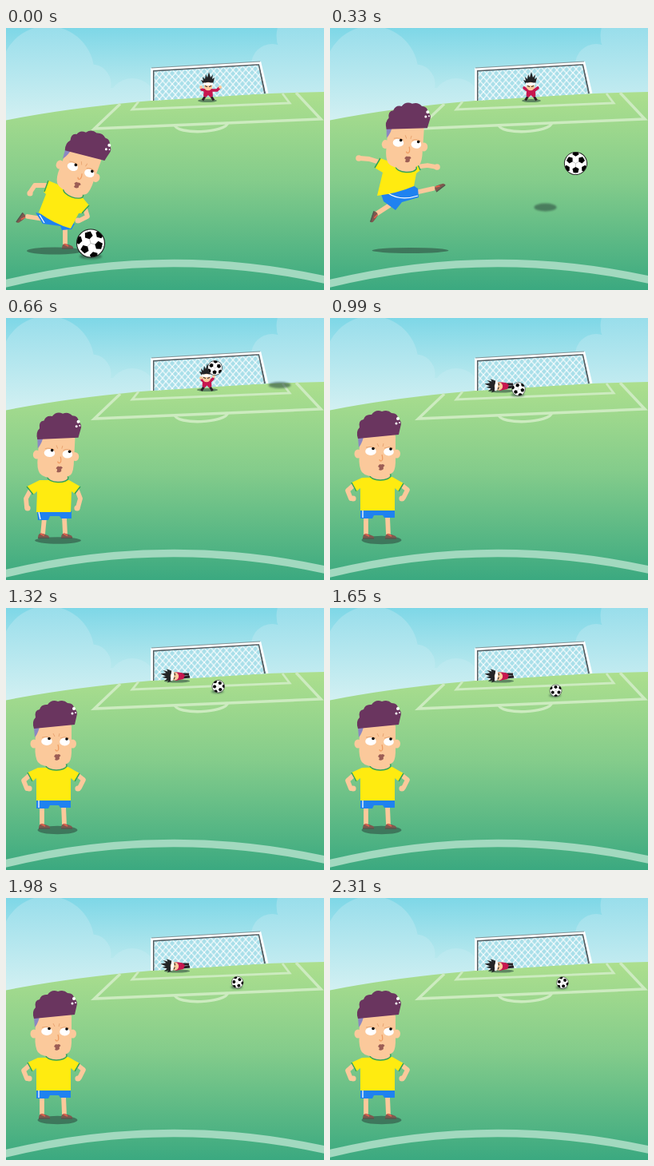
Write an HTML page that moves like this. It is 398 px wide and 328 px high and loops after 3300 ms.

```html
<!DOCTYPE html>
<html lang="en">
<head>
<meta charset="utf-8">
<title>Penalty kick</title>
<style>
html, body { margin: 0; width: 100%; height: 100%; overflow: hidden; }
svg { display: block; width: 398px; height: 328px; }
.pose, .keeper { display: none; }
.on { display: inline; }
.shade { fill: #2f4f42; opacity: .6; }
#ballShade { filter: blur(.8px); }
.skin { fill: #fbc99b; }
.limb { fill: none; stroke: #fbc99b; stroke-width: 5.8; stroke-linecap: round; stroke-linejoin: round; }
.shirt { fill: #ffeb10; }
.shorts { fill: #1f82f0; }
.trim { fill: none; stroke: #35a35a; stroke-width: 1.5; }
.stripe { fill: none; stroke: #fff; stroke-width: 1.3; }
.red { fill: #c6174f; }
.redArm { fill: none; stroke: #c6174f; stroke-width: 3.6; stroke-linecap: round; stroke-linejoin: round; }
.boot { fill: none; stroke: #2a2226; stroke-width: 3; }
.line { fill: none; stroke: #cdebc0; stroke-width: 3.4; }
</style>
</head>
<body>
<svg viewBox="0 0 398 328">
  <defs>
    <linearGradient id="sky" x2="0" y2="1">
      <stop stop-color="#7ed7e7"/><stop offset="1" stop-color="#d8f2f1"/>
    </linearGradient>
    <linearGradient id="cloud" gradientUnits="userSpaceOnUse" x1="0" y1="0" x2="0" y2="115">
      <stop stop-color="#99deeb"/><stop offset="1" stop-color="#d2f0f2"/>
    </linearGradient>
    <linearGradient id="grass" gradientUnits="userSpaceOnUse" x1="0" y1="80" x2="0" y2="328">
      <stop stop-color="#addf8e"/><stop offset=".45" stop-color="#84cc8b"/><stop offset="1" stop-color="#3ba980"/>
    </linearGradient>
    <pattern id="net" width="8" height="9" patternUnits="userSpaceOnUse" patternTransform="skewY(-3)">
      <path d="M-1-1.100L9 10.100M9-1.100L-1 10.100" stroke="#fff" stroke-width="1.1"/>
    </pattern>
    <clipPath id="round"><circle r="17.5"/></clipPath>
    <path id="patch" d="M-5 0L-2-5 4-3.500V3.500L-2 5Z"/>
    <g id="ballArt">
      <circle r="17.5" fill="#fff"/>
      <g id="patches" clip-path="url(#round)"></g>
      <circle r="17.5" fill="none" stroke="#222" stroke-width="1.2"/>
    </g>
    <!-- head, centred between the eyes -->
    <g id="head">
      <ellipse cx="1" cy="31" rx="13" ry="6" fill="#fbc99b" class="collar" stroke="#35a35a" stroke-width="1.4"/>
      <ellipse class="skin" cx="-27" cy="4" rx="4.500" ry="5.500"/>
      <ellipse class="skin" cx="21.500" cy="4" rx="4.500" ry="5.500"/>
      <path class="skin" d="M-25-17Q-24-39-5-39T20-18V8Q20.500 23 17 27 11 32 0 33-17 33-22 27-26 21-25.500 8Z"/>
      <path d="M-27-16L-19-22Q-21-10-26-4Z" fill="#8b87c2"/>
      <path d="M-27-15Q-30-24-25-29-27-38-20-39-18-46-10-45-5-52 3-49 10-52 15-47 23-47 23-40 29-37 26-29 25-25 24-20 20-17V-11Q18-15 18-27 15-35 6-34-2-36-8-31-11-25-17-23-20-17-27-15Z" fill="#6a355f"/>
      <g fill="#fff">
        <circle cx="23" cy="-40" r="2"/><circle cx="21" cy="-34" r="1.500"/><circle cx="25" cy="-35" r="1"/>
        <ellipse cx="-11" cy="1" rx="6.800" ry="5"/><ellipse cx="11.500" cy="1.500" rx="6.300" ry="5"/>
      </g>
      <path d="M-17-4Q-11-6-5-3M6-3Q11-6 17-3M-3-9L-1-5M5-9L4-5" fill="none" stroke="#e9a673" stroke-width="1"/>
      <circle cx="-8" cy="-2.500" r="1.800"/><circle cx="14" cy="-2" r="1.800"/>
      <path d="M3 5Q5 12 2 13 0 13 0 11" fill="none" stroke="#ef9d63" stroke-width="1.300"/>
      <path d="M-2 20Q0 16 2 17.500 5 16 6.500 19 4 20 5 23 2 26-1 24 1 21-2 20Z" fill="#9c5d55"/>
    </g>
    <g id="shoe">
      <path d="M-6 3Q-6-3-2-3 3-2 7 0 9 2 8 3.500H-6Z" fill="#80584e"/>
      <path d="M-6 3H8" stroke="#4f5a50" stroke-width="1.400"/>
      <path d="M-3-2.500L2 0" stroke="#e8604c" stroke-width="1.600"/>
    </g>
    <g id="keeperHead">
      <path d="M-6 1L-9-4-6-3-7-8-4-5-3-11-1-7 1-14 3-7 6-11 5-5 8-7 6 1Z" fill="#242426"/>
      <circle class="skin" cy="4" r="5.200"/>
      <path d="M-6 2Q0 4 6 2L6-.500H-6Z" fill="#fff"/>
      <path d="M-4 3.500L-1 4.500M4 3.500L1 4.500" stroke="#222"/>
    </g>
    <!-- standing body, placed like the head -->
    <g id="keeperBody">
      <path class="boot" d="M-4 17L-7 21.500M4 17L7 21.500"/>
      <path class="red" d="M-5 7H5L6 16 3 18 0 15-3 18-6 16Z"/>
    </g>
  </defs>

  <rect width="398" height="118" fill="url(#sky)"/>
  <g fill="url(#cloud)">
    <circle cx="52" cy="56" r="58.500"/><circle cx="107" cy="70" r="24.500"/>
    <circle cx="158" cy="93" r="30"/><rect y="75" width="185" height="45"/>
    <circle cx="378" cy="10" r="39.500"/><circle cx="333" cy="46" r="26"/>
    <rect x="322" y="42" width="76" height="50"/>
  </g>
  <path d="M0 115.500Q150 85.500 398 80V328H0Z" fill="url(#grass)"/>
  <g class="line">
    <path d="M143 95L110.500 126 394 114 363 81"/>
    <path d="M166 92L158 102 355 94 346 82" stroke-width="2.800"/>
    <path d="M211 121C213 134 276 132 278 118"/>
  </g>
  <path d="M-5 321Q200 270.500 403 316" fill="none" stroke="#a2d9bf" stroke-width="9.600"/>
  <path d="M184 53L318 45 326 82 184 91Z" fill="#a9dfe9"/>
  <path d="M184 53L318 45 326 82 184 91Z" fill="url(#net)"/>
  <path d="M184.500 91V53.500L316.500 45.500 324 82" fill="none" stroke="#555c60" stroke-width="1.800"/>
  <path d="M182.500 91V51.500L318 43.500 327 82" fill="none" stroke="#fff" stroke-width="2.800"/>
  <path d="M182 50L318 42" stroke="#777f82" stroke-width=".8"/>

  <g class="keeper">
    <ellipse class="shade" cx="252" cy="91" rx="12" ry="2"/>
    <use href="#keeperBody" x="253" y="69"/>
    <path class="redArm" d="M249 78L245 77M257 78L264 78 267 75"/>
    <circle class="skin" cx="244" cy="74" r="2"/><circle class="skin" cx="268" cy="74" r="2"/>
    <use href="#keeperHead" x="253" y="69"/>
  </g>
  <g class="keeper">
    <ellipse class="shade" cx="252" cy="91" rx="12" ry="2"/>
    <use href="#keeperBody" x="251.500" y="69"/>
    <path class="redArm" d="M247 78L243 75M256 78L260 75"/>
    <use href="#keeperHead" x="251" y="69"/>
  </g>
  <g class="keeper">
    <ellipse class="shade" cx="252" cy="90" rx="13" ry="2"/>
    <use href="#keeperBody" x="251.500" y="69.500"/>
    <path class="redArm" d="M248 80L245 77M255 80L259 76"/>
    <circle class="skin" cx="244" cy="75" r="2"/><circle class="skin" cx="260" cy="73" r="2"/>
    <use href="#keeperHead" x="251" y="71"/>
  </g>
  <g class="keeper">
    <ellipse class="shade" cx="214" cy="91.500" rx="16" ry="2"/>
    <path class="boot" d="M220 83L229 83M221 87L230 86"/>
    <path class="red" d="M211 80L220 81 224 84 222 89 212 91Z"/>
    <use href="#keeperHead" transform="translate(207 85) rotate(-84)"/>
  </g>

  <ellipse id="ballShade" class="shade"/>

  <g class="pose">
    <ellipse class="shade" cx="61" cy="279" rx="35" ry="4.500"/>
    <path class="limb" d="M46 239L27 236M74 247L74 270"/>
    <use href="#shoe" transform="translate(20 238) rotate(125)"/>
    <use href="#shoe" transform="translate(76 273)"/>
    <path class="limb" d="M50 197L36 197 30 206"/>
    <circle class="skin" cx="30" cy="207" r="3.600"/>
    <path class="shorts" d="M37 231L46 245 68 248 70 253 82 252 86 245Z"/>
    <path class="stripe" d="M42 234L48 244"/>
    <path class="limb" d="M99 226L102 236 92 241"/>
    <circle class="skin" cx="90" cy="241" r="3.600"/>
    <path class="shirt" d="M53 191L47 205 50 208 41 231Q60 245 81 251L91 232 95 232 104 222 93 209 70 198Z"/>
    <path class="trim" d="M53 191L48 205M104 222L95 232"/>
    <use href="#head" transform="translate(94 176.500) rotate(20)"/>
  </g>
  <g class="pose">
    <ellipse class="shade" cx="100.500" cy="278.500" rx="48" ry="3.400"/>
    <path class="limb" d="M62 168L49 164 37 163M107 174L122 172 133 174M107 206L129 201M76 221L59 232"/>
    <circle class="skin" cx="36" cy="163" r="3.800"/><circle class="skin" cx="134" cy="174" r="3.800"/>
    <use href="#shoe" transform="translate(136 199) rotate(-38)"/>
    <use href="#shoe" transform="translate(56 236) rotate(108)"/>
    <path class="shorts" d="M64 208L104 197 110 201 111 212 90 218 82 228 67 217Z"/>
    <path class="stripe" d="M73 207Q88 217 110 210"/>
    <path class="shirt" d="M63 163L56 175 66 181 59 210Q84 207 105 198L108 182 113 178 109 169 90 173Z"/>
    <path class="trim" d="M63 163L56 175M109 169L113 178"/>
    <use href="#head" transform="translate(96.500 143.500) rotate(4)"/>
  </g>
  <g class="pose">
    <ellipse class="shade" cx="65" cy="278.500" rx="29" ry="4.200"/>
    <path class="limb" d="M48 250L46 271M73 250L74 270M32 213L25 226 26 237M88 213L93 226 90 237"/>
    <circle class="skin" cx="27" cy="238" r="3.600"/><circle class="skin" cx="89" cy="238" r="3.600"/>
    <use href="#shoe" transform="translate(46 272.500)"/><use href="#shoe" transform="translate(75 272.500)"/>
    <path class="shorts" d="M39 242H82L82 251H69L67 248H55L53 253H40Z"/>
    <path class="stripe" d="M41 243L43 252"/>
    <path class="shirt" d="M42 203L26 211 34 221 39 217 38 243H81L82 217 86 220 93 211 79 203Z"/>
    <path class="trim" d="M26 211L34 221M93 211L86 220"/>
    <use href="#head" transform="translate(65.500 168.500) rotate(3)"/>
  </g>
  <g class="pose">
    <ellipse class="shade" cx="64.500" cy="278" rx="25" ry="5.200"/>
    <path class="limb" d="M45 248L45 271M72 248L73 271M31 208L22 216 26 226M88 208L97 215 92 225"/>
    <circle class="skin" cx="29" cy="226" r="3.600"/><circle class="skin" cx="90" cy="226" r="3.600"/>
    <use href="#shoe" transform="translate(47 273)"/><use href="#shoe" transform="translate(75 273)"/>
    <path class="shorts" d="M38 240H81V250H68L66 247H55L53 251H38Z"/>
    <path class="stripe" d="M41 241V250"/>
    <path class="shirt" d="M40 200L27 206 33 217 38 213V241H81V213L86 217 92 207 78 199Z"/>
    <path class="trim" d="M27 206L33 217M92 207L86 217"/>
    <use href="#head" x="62" y="166"/>
  </g>

  <use id="ball" href="#ballArt"/>
</svg>
<script>
const $ = id => document.getElementById(id);
const poses = document.querySelectorAll('.pose');
const keepers = document.querySelectorAll('.keeper');
const STEP = 330, LOOP = 3300;

// Near patches and edge patches alternate around the ball, joined by seams.
$('patches').innerHTML = [0, 1, 2, 3, 4, 5].map(i => `<g transform="rotate(${i * 60 - 105})">
  <path d="M0 0H18" stroke="#aaa" stroke-width=".7" visibility="${i % 2 ? 'hidden' : 'visible'}"/>
  <use href="#patch" x="${i % 2 ? 16 : 10.5}"/></g>`).join('');

// Ball x, y, radius, turn; shadow x, y, rx, ry
const kicks = [
  [106, 269.5, 18, 0, 106, 286, 14, 3.5],
  [307.5, 169.5, 14.5, 75, 269.5, 224.5, 14, 5],
  [261.5, 62.5, 9.3, 80, 342.5, 84, 14, 4]
];
// After the save the ball rolls out and slows down.
function rollOut(i) {
  const k = 1 - (1 - i / 4) ** 2.7;
  const x = 236 + 55 * k, y = 89 + 17 * k, r = 8.6 - 1.1 * k;
  return [x, y, r, 300 * k, x - 1, y + r - 1.5, r, 2.2];
}

function draw(now) {
  const n = Math.min(7, Math.floor(now % LOOP / STEP));
  const pose = Math.min(n, 3);
  poses.forEach((p, i) => p.classList.toggle('on', i === pose));
  keepers.forEach((k, i) => k.classList.toggle('on', i === pose));
  const [x, y, r, turn, sx, sy, rx, ry] = kicks[n] || rollOut(n - 3);
  $('ball').setAttribute('transform', `translate(${x} ${y}) rotate(${turn}) scale(${r / 18})`);
  Object.entries({ cx: sx, cy: sy, rx, ry }).forEach(([k, v]) => $('ballShade').setAttribute(k, v));
}

const start = performance.now();
function tick() {
  draw(performance.now() - start);
  requestAnimationFrame(tick);
}
tick();
</script>
</body>
</html>
```
